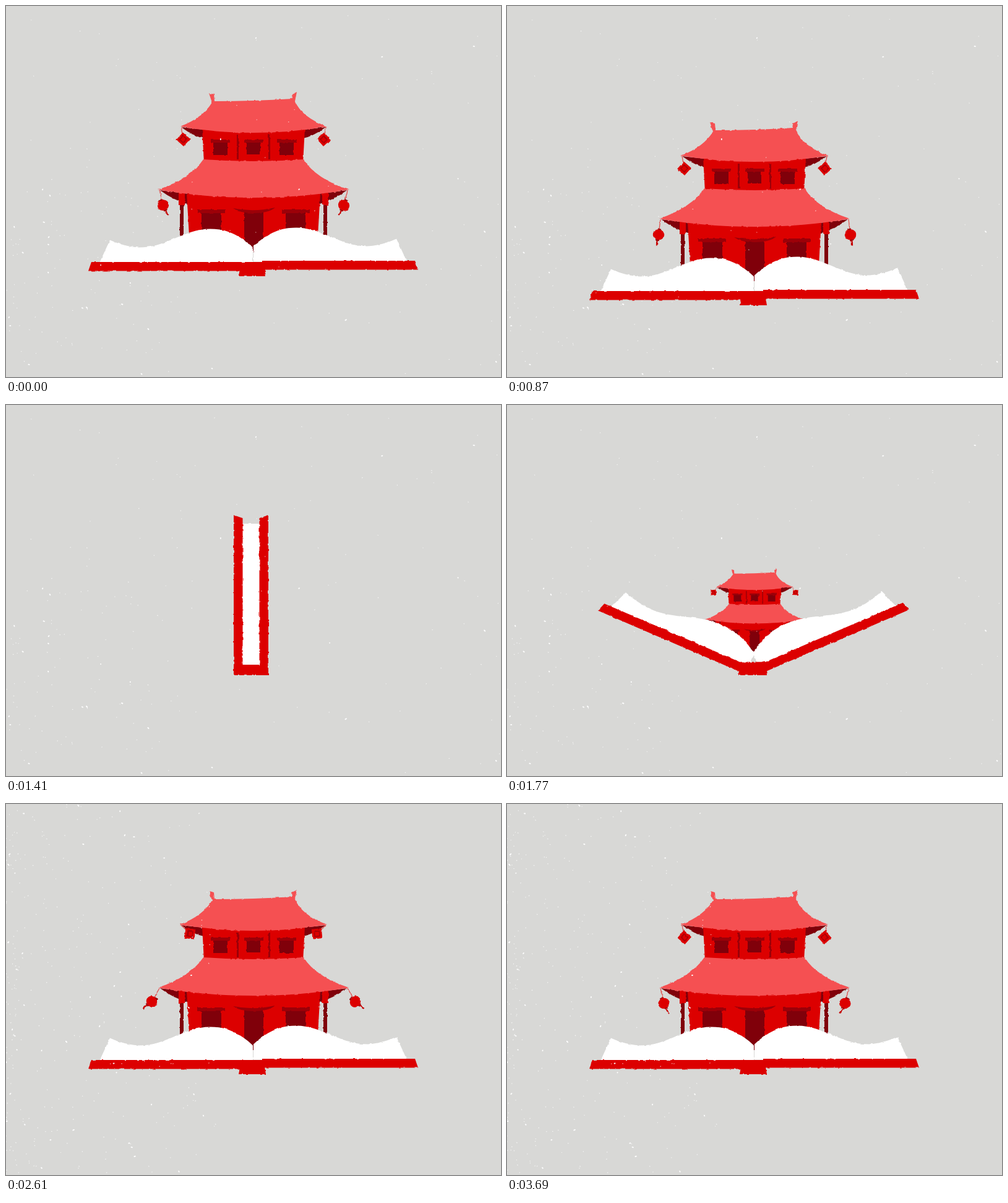
Recreate the animation shown at these times as an HTML page. Size 800x600 px, loop 3750 ms.

```html
<!DOCTYPE html>
<html lang="en">
<head>
<meta charset="utf-8">
<title>Pop-up temple book</title>
<style>
html, body { margin: 0; width: 100%; height: 100%; overflow: hidden; background: #d8d8d6; }
svg { display: block; width: 800px; height: 600px; }
.light { fill: #f55052; }
.red { fill: #dc0000; }
.trim { fill: #9c0008; }
.dark { fill: #80000a; }
.dust { fill: none; stroke: #fff; stroke-linecap: round; }
.string { stroke: #e0504e; stroke-width: 1.3; }
</style>
</head>
<body>
<svg viewBox="0 0 800 600">
  <defs>
    <filter id="rough" filterUnits="userSpaceOnUse" x="0" y="0" width="800" height="600" color-interpolation-filters="sRGB">
      <feTurbulence id="noise" type="fractalNoise" baseFrequency="0.15" numOctaves="2" result="n"/>
      <feDisplacementMap in="SourceGraphic" in2="n" scale="3" xChannelSelector="R" yChannelSelector="G"/>
    </filter>
  </defs>
  <rect width="800" height="600" fill="#d8d8d6"/>
  <g filter="url(#rough)">
    <g id="scene">
      <g id="temple">
        <g id="half">
          <path class="dark" d="M283 196L320 200V214Q304 211 283 196ZM249 298L296 304V321Q272 315 249 298ZM281 318H287V374H281Z"/>
          <path class="red" d="M279 302H289V322H279ZM317 198H401V254H320ZM292 302H401V398H384L296 372Z"/>
          <path class="dark" d="M335 217H358V241H335ZM316 332H348V366H316Z"/>
          <path class="trim" d="M373 208H376V248H373ZM331 216H362V221H331ZM309 329H354V335H309Z"/>
        </g>
        <use href="#half" transform="matrix(-1 0 0 1 800 0)"/>
        <path class="dark" d="M389 217H411V240H389ZM385 332H416V398H385Z"/>
        <path class="trim" d="M385 216H416V221H385ZM367 327Q400 334 435 326Q424 335 400 335Q378 335 367 327Z"/>
        <path class="light" d="M328 141L336 143L337 154Q400 154 463 150L462 143L470 139L467 154Q478 180 519 195Q460 205 400 205Q340 205 281 195Q318 181 333 156Z"/>
        <path class="light" d="M319 248Q400 254 481 248Q500 279 554 297Q480 310 400 310Q320 310 246 297Q298 279 319 248Z"/>
        <g id="lanterns">
          <line id="highString" class="string"/>
          <g id="high">
            <rect class="red" x="-8" y="-8" width="16" height="16"/>
            <rect x="-4" y="-4" width="8" height="8" fill="none" stroke="#a50007" stroke-width="1.6"/>
          </g>
          <line id="lowString" class="string"/>
          <g id="low">
            <path d="M0 8V13L1 18" fill="none" stroke="#c60000" stroke-width="2.2"/>
            <ellipse class="red" rx="9.3" ry="8.5"/>
            <path class="trim" d="M-3 -10H3V-8H-3ZM-3 8H3V10H-3Z"/>
          </g>
        </g>
        <use href="#lanterns" transform="matrix(-1 0 0 1 800 0)"/>
      </g>
      <path id="pageL" fill="#fff"/>
      <path id="pageR" fill="#fff"/>
      <path id="coverL" class="red"/>
      <path id="coverR" class="red"/>
      <path id="spine" class="red"/>
    </g>
    <g id="stars"></g>
  </g>
  <g id="dust"></g>
</svg>
<script>
const LOOP = 3750, STEP = 45, LAST = 82, CYCLE = 83;
const $ = id => document.getElementById(id);
const set = (el, key, value) => el.setAttribute(key, value);
const lerp = (a, b, k) => a + (b - a) * k;
const clamp = x => Math.max(0, Math.min(1, x));
const part = (s, a, b) => clamp((s - a) / (b - a));
const smooth = x => x * x * (3 - 2 * x);
const backOut = x => 1 + 2.4 * (x - 1) ** 3 + 1.4 * (x - 1) ** 2;
const show = (el, on) => set(el, "visibility", on ? "visible" : "hidden");
const poly = pts => "M" + pts.map(p => p.map(n => n.toFixed(2)).join(" ")).join("L") + "Z";

function add(parent, name, attrs) {
  const el = document.createElementNS("http://www.w3.org/2000/svg", name);
  for (const key in attrs) set(el, key, attrs[key]);
  return parent.appendChild(el);
}

function random(seed) {
  return () => {
    seed = (seed * 1664525 + 1013904223) % 4294967296;
    return seed / 4294967296;
  };
}

// Smooth cyclic curve through [step, value] keys
function curve(keys, s) {
  const n = keys.length;
  const time = i => keys[(i + n) % n][0] + Math.floor(i / n) * CYCLE;
  const value = i => keys[(i + n) % n][1];
  const slope = i => (value(i + 1) - value(i - 1)) / (time(i + 1) - time(i - 1));
  let i = n - 1;
  while (keys[i][0] > s) i--;
  const span = time(i + 1) - time(i), x = (s - time(i)) / span;
  return lerp(value(i), value(i + 1), smooth(x))
    + span * x * (1 - x) * ((1 - x) * slope(i) - x * slope(i + 1));
}

// Outward swing in degrees
const highSwing = [[0, -10], [20, -10], [48, 38], [58, -46], [73, -26]];
const lowSwing = [[0, -14], [20, 7], [48, 55], [58, 30], [73, 16]];

function hang(name, x, y, length, swing, spin) {
  const a = swing * Math.PI / 180;
  const endX = x - length * Math.sin(a), endY = y + length * Math.cos(a);
  const line = $(name + "String");
  set(line, "x1", x);
  set(line, "y1", y);
  set(line, "x2", endX);
  set(line, "y2", endY);
  set($(name), "transform", `translate(${endX} ${endY}) rotate(${spin})`);
}

// Sparkles: x, y, first step
const stars = [[555, 174, 43.5], [560, 195, 43], [200, 269, 43.5], [222, 273, 43],
  [214, 253, 45.5], [261, 177, 46.5], [234, 192, 47.4], [603, 281, 47.2]].map(([x, y, from]) => ({
  x, y, from,
  el: add($("stars"), "path", { class: "light", d: "M0 -6Q1.2 -1.2 6 0Q1.2 1.2 0 6Q-1.2 1.2 -6 0Q-1.2 -1.2 0 -6Z" })
}));

// Dust sheets: fine specks with some bolder flecks
function sheet(seed, count, place, fine, bold) {
  const rnd = random(seed), g = add($("dust"), "g", {});
  const specks = ["", ""];
  for (let i = 0; i < count; i++) {
    const [x, y] = place(rnd, i);
    const big = rnd() < 0.14 ? 1 : 0;
    const dx = rnd() * (0.6 + big), dy = (rnd() - 0.5) * (1 + 2 * big);
    specks[big] += `M${x.toFixed(1)} ${y.toFixed(1)}l${dx.toFixed(1)} ${dy.toFixed(1)}`;
  }
  specks.forEach((d, big) => add(g, "path", {
    class: "dust", d, "stroke-width": big ? bold : fine, opacity: big || fine > 1.5 ? 1 : 0.75
  }));
  return g;
}

const anywhere = r => [r() * 800, r() * 600];
const lowerLeft = (r, i) => i % 3 ? anywhere(r) : [r() * r() * 400, 300 + r() * 280];
const leftSide = r => [340 * r() ** 1.8, r() * 600];
let hub = [0, 0];
function clumps(r, i) {
  if (i % 8 === 0) hub = anywhere(r);
  const spread = i % 8 < 5 ? 40 : 160;
  return hub.map(c => c + (r() + r() - 1) * spread);
}

const sheets = [
  sheet(11, 200, lowerLeft, 1.1, 1.8),
  sheet(53, 230, clumps, 2, 2.5),
  sheet(47, 320, leftSide, 1.2, 1.8),
  sheet(83, 200, anywhere, 1.1, 1.8)
];

// Page profile in hinge space: u runs outwards, v towards the inside
function pageHeight(u) {
  return u < 47 ? 68 - 30 * ((47 - u) / 69) ** 2.2 : 53 + 15 * Math.cos(Math.PI * (u - 47) / 113);
}

function pageShape(shut) {
  const pts = [[lerp(-22, 17, shut), 13], [lerp(226, 245, shut), 13]], n = 30;
  for (let i = n; i >= 0; i--) {
    const u = lerp(-22, 209, i / n);
    pts.push([lerp(u, lerp(17, 245, i / n), shut), lerp(pageHeight(u), 30, shut)]);
  }
  return pts;
}

function drawHalf(name, side, x, y, shut) {
  const angle = shut * Math.PI / 2, cos = Math.cos(angle), sin = Math.sin(angle);
  const toStage = ([u, v]) => [x + side * (u * cos - v * sin), y - u * sin - v * cos];
  const length = lerp(244, 259, shut), inner = lerp(-8, 0, shut), thick = 14.5;
  const cover = [[inner, 0], [length, 0], [length - 5, thick], [inner, thick]];
  set($("cover" + name), "d", poly(cover.map(toStage)));
  set($("page" + name), "d", poly(pageShape(shut).map(toStage)));
}

function drawBook(shut) {
  drawHalf("L", -1, lerp(377, 368, shut), lerp(428.5, 437, shut), shut);
  drawHalf("R", 1, lerp(422, 424, shut), lerp(426.5, 437, shut), shut);
  const left = lerp(376, 368, shut), right = lerp(420, 424, shut);
  const slant = lerp(4, 0, shut), top = lerp(414, 420, shut);
  set($("spine"), "d", poly([[left + slant, top], [right - slant, top], [right, 437], [left, 437]]));
}

function draw(t) {
  const s = Math.min(LAST, Math.floor((t + 30) / STEP));
  const shut = smooth(part(s, 20, 26)) - smooth(part(s, 36, 42));
  const dip = 47 * (smooth(part(s, 12, 20)) - smooth(part(s, 20, 25)));
  const size = s < 34 ? clamp(1 - 1.5 * shut) : s < 39 ? 0 : backOut(part(s, 39, 46));

  set($("noise"), "seed", 3 + s % 8);
  set($("scene"), "transform", `translate(0 ${dip})`);
  set($("temple"), "transform", `translate(400 400) scale(${size}) translate(-400 -400)`);
  show($("temple"), size > 0.01);
  drawBook(shut);

  const high = curve(highSwing, s), low = curve(lowSwing, s);
  hang("high", 283, 196, 20, high, high - 38);
  hang("low", 248, 298, 25, low, low * 1.8);

  for (const star of stars) {
    const life = part(s, star.from, star.from + 9);
    const drift = (s - 48) * Math.sign(star.x - 400);
    set(star.el, "transform", `translate(${star.x + drift} ${star.y}) scale(${Math.sin(Math.PI * life)})`);
    show(star.el, life > 0 && life < 1);
  }

  sheets.forEach((g, i) => show(g, i === s % 4));
}

const start = performance.now();
function tick() {
  draw((performance.now() - start) % LOOP);
  requestAnimationFrame(tick);
}
tick();
</script>
</body>
</html>
```
